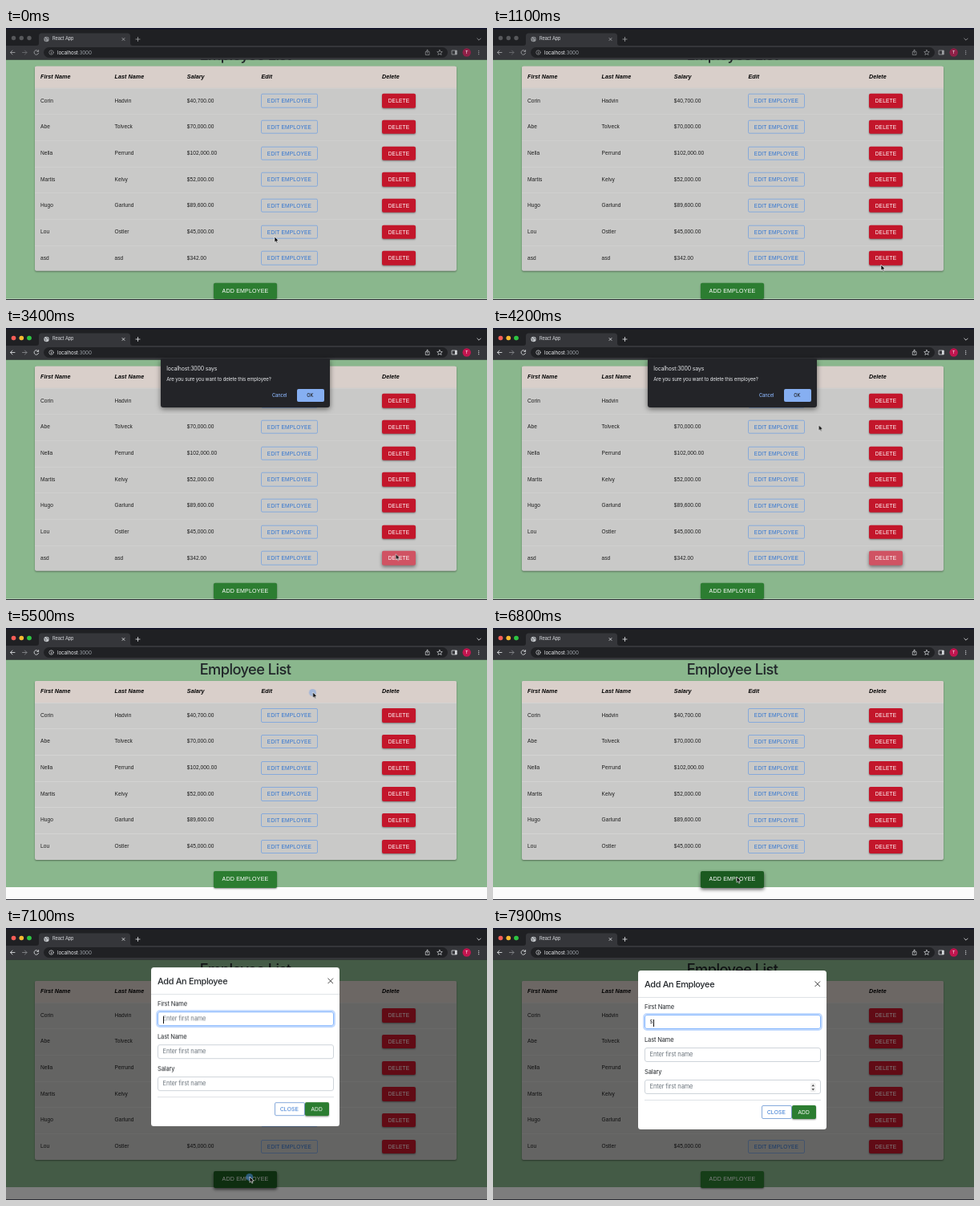
These frames come from a looping animation (600x339 px, 8000 ms). An HTML page:

```html
<!DOCTYPE html>
<html lang="en">
<head>
<meta charset="utf-8">
<title>Employee List</title>
<style>
html, body { margin: 0; width: 100%; height: 100%; overflow: hidden; background: #fbfbfb; }
#stage { position: relative; width: 600px; height: 339px; overflow: hidden; background: #fbfbfb;
  font: 6.58px/1 "Liberation Sans", Arial, sans-serif; letter-spacing: .01em; color: #1d1d1d; }
#stage * { box-sizing: border-box; white-space: nowrap; }
.abs, .cell, .ui { position: absolute; }
.ui { font-family: Inter, sans-serif; letter-spacing: -.02em; transform: translateY(-50%); }
[class*="t-"] { animation: 8s step-end infinite; }

/* page */
#page { position: absolute; left: 0; top: 39px; width: 600px; background: #8ab78d; animation-name: scroll; }
h1 { margin: 0; padding-top: 1px; height: 27px; text-align: center; color: #202529;
  font: 500 18.2px/22.6px Inter, sans-serif; letter-spacing: -.03em; position: relative; left: -1.5px; }
#table { margin-left: 36px; width: 525.5px; border-radius: 2px; background: #c9c9c8; box-shadow: 0 1px 2px rgba(0,0,0,.4); }
.head, .row { position: relative; }
.head { height: 26.6px; background: #d9cfca; border-radius: 2px 2px 0 0; font: italic bold 7.15px/26px "Liberation Sans", Arial, sans-serif; color: #000; }
.row { height: 32.7px; line-height: 32.7px; box-shadow: inset 0 .6px #dedede; }
.last { overflow: hidden; animation-name: remove; }
.btn { position: absolute; height: 17.4px; line-height: 17.4px; border-radius: 2px; text-align: center; letter-spacing: .0286em; }
.edit { left: 282px; top: 7.6px; width: 71px; border: .6px solid #86aadb; line-height: 16.2px; color: #2e73d0; }
.del { left: 433px; top: 7.6px; width: 42px; background: #c3162b; color: #fff; box-shadow: 0 1px 2px rgba(0,0,0,.4); }
.last .del { animation: press 8s linear infinite; }
.foot { position: relative; height: 34.7px; }
.add { left: 259px; top: 14.6px; width: 79px; height: 20.4px; line-height: 20.4px; font-size: 7.05px;
  background: #2c7d31; color: #fff; box-shadow: 0 1px 2px rgba(0,0,0,.45); animation: hover 8s linear infinite; }

/* browser frame */
#chrome { position: absolute; left: 0; top: 0; }
.lights { animation-name: lights; }
.icons { animation-name: icons; }
.bottom { left: 0; top: 337.8px; width: 600px; height: 2px; background: #2b2c33; }

#confirm { left: 192.5px; top: 38px; width: 211.5px; height: 61px; border-radius: 1px 1px 3px 3px; background: #232428;
  color: #e8eaed; box-shadow: 0 2px 6px rgba(0,0,0,.5); animation-name: confirm; }
#confirm .ok { left: 170.5px; top: 38px; width: 33.5px; height: 15.5px; border-radius: 2px; background: #86aff2; }

/* modal */
#shade { left: 0; top: 39px; width: 600px; height: 300px; background: #000; animation: shade 8s linear infinite; }
#modal { left: 181px; top: 53px; width: 235px; height: 198px; border-radius: 3.5px; background: #fff; color: #212529;
  animation: fade 8s linear infinite, slide 8s infinite; }
#modal .rule { left: 0; width: 235px; height: .6px; background: #dee2e6; }
#modal .label { left: 8px; font-size: 7.5px; }
.field { position: absolute; left: 8px; width: 220px; height: 18px; border: .6px solid #ced4da; border-radius: 3px; }
.field .ui { left: 5.6px; top: 50%; font-size: 7.5px; color: #6c757d; }
.focus { border-color: #86b7fe; box-shadow: 0 0 0 1.9px #c2dafe; }
.field .typed { color: #212529; animation-name: typed; }
.hint { animation-name: hint; }
.caret { left: 5.8px; top: 4.5px; width: .7px; height: 9px; background: #111; animation-name: caret; }
.spin { left: 206px; top: 3px; animation-name: spin; }
.close { left: 153.5px; top: 168px; width: 38px; border: .6px solid #86aadb; line-height: 16.2px; color: #2e73d0; }
.save { left: 191.5px; top: 168px; width: 30.5px; background: #2c7d31; color: #fff; box-shadow: 0 1px 2px rgba(0,0,0,.4); }

#cursor { left: 0; top: 0; overflow: visible; animation: move 8s linear infinite; }
#cursor path { animation-name: hide; }
#cursor circle { animation: click 8s linear infinite; }

@keyframes scroll { 0% { transform: translateY(-18.3px); } 66.1%, 100% { transform: none; } }
@keyframes remove { 0% { height: 32.7px; } 66.1%, 100% { height: 0; } }
@keyframes press {
  0%, 38% { background: #c3162b; box-shadow: 0 1px 2px rgba(0,0,0,.4); }
  42%, 100% { background: #d05363; box-shadow: 0 2px 4px rgba(0,0,0,.45); }
}
@keyframes hover {
  0%, 82.6%, 92%, 100% { background: #2c7d31; box-shadow: 0 1px 2px rgba(0,0,0,.45); }
  84.6%, 88.5% { background: #1b5a20; box-shadow: 0 2px 4px rgba(0,0,0,.6); }
}
@keyframes lights { 0% { opacity: 0; } 29.8%, 100% { opacity: 1; } }
@keyframes icons { 0% { opacity: .65; } 31%, 100% { opacity: 1; } }
@keyframes confirm { 0% { visibility: hidden; } 41.1% { visibility: visible; } 66.1%, 100% { visibility: hidden; } }
@keyframes shade { 0%, 86.1% { opacity: 0; } 88%, 100% { opacity: .5; } }
@keyframes fade { 0%, 86.3% { opacity: 0; } 88.2%, 100% { opacity: 1; } }
@keyframes slide {
  0%, 86.3% { transform: translateY(-23.5px); animation-timing-function: ease-out; }
  90.05%, 100% { transform: none; }
}
@keyframes typed { 0% { opacity: 0; } 97.3%, 100% { opacity: 1; } }
@keyframes hint { 0% { opacity: 1; } 97.3%, 100% { opacity: 0; } }
@keyframes caret { 0% { opacity: 1; } 93.7% { opacity: 0; } 97.3%, 100% { opacity: 1; transform: translateX(4px); } }
@keyframes spin { 0% { opacity: 0; } 93.7%, 100% { opacity: 1; } }
@keyframes hide { 0% { opacity: 1; } 97.3%, 100% { opacity: 0; } }
@keyframes click {
  0%, 66%, 71%, 86%, 90%, 100% { opacity: 0; }
  66.5% { opacity: .7; }
  68.75% { opacity: .38; }
  86.5%, 87.8% { opacity: .85; }
}
@keyframes move {
  0%, 1% { transform: translate(335px, 260px); }
  2.5%, 4% { transform: translate(345px, 284px); animation-timing-function: ease-in-out; }
  13.75%, 16.5% { transform: translate(484px, 295px); }
  25%, 41% { transform: translate(489px, 286.5px); animation-timing-function: ease-in; }
  51.25% { transform: translate(410px, 148px); }
  52.5% { transform: translate(406.5px, 121px); animation-timing-function: ease-out; }
  55%, 58% { transform: translate(391px, 92px); }
  63.75%, 70% { transform: translate(382.7px, 80px); }
  75%, 78% { transform: translate(355px, 200px); animation-timing-function: ease-in-out; }
  84%, 89.5% { transform: translate(304px, 310px); animation-timing-function: ease-in-out; }
  95%, 100% { transform: translate(300px, 196px); }
}
</style>
</head>
<body>
<div id="stage">
  <div id="page" class="t-page">
    <h1>Employee List</h1>
    <div id="table"></div>
    <div class="foot"><div class="btn add">ADD EMPLOYEE</div></div>
  </div>

  <div id="shade" class="abs"></div>

  <svg id="chrome" width="600" height="40" fill="none" stroke-linecap="round" stroke-linejoin="round">
    <path fill="#1f2023" d="M0 0H600V39.5H0Z"/>
    <path fill="#11122c" d="M0 0H600V1.6H0Z"/>
    <path fill="#35363a" d="M0 22H38Q41 22 41 19V10Q41 6.500 44.500 6.500H151.500Q155 6.500 155 10V19Q155 22 158 22H600V39.500H0Z"/>
    <rect x="47" y="24" width="504" height="13" rx="6.500" fill="#202124"/>
    <g fill="#57585b"><circle cx="9.500" cy="12.500" r="2.700"/><circle cx="19.300" cy="12.500" r="2.700"/><circle cx="29" cy="12.500" r="2.700"/></g>
    <g class="t-lights lights">
      <circle cx="9.500" cy="12.500" r="2.800" fill="#fb5d56"/><circle cx="19.300" cy="12.500" r="2.800" fill="#fcbb2f"/><circle cx="29" cy="12.500" r="2.800" fill="#2bc640"/>
    </g>
    <g class="t-icons icons" stroke="#d5d7da" stroke-width=".9">
      <circle cx="50.500" cy="14" r="3.200" fill="#c4c7cb" stroke="none"/>
      <path stroke="#4b4d52" stroke-width=".8" d="M48.300 13L50 14.200L49.500 16M51 11.500L51.500 13L53 13.700"/>
      <path d="M145 12.500l3 3m0-3l-3 3M162 14h5m-2.500-2.500v5M587.800 13l2.200 2.200l2.200-2.200"/>
      <path d="M11 30.500H5.500M8 28l-2.500 2.500L8 33"/>
      <path stroke="#85878b" d="M20.500 30.500H26M23.500 28l2.500 2.500L23.500 33"/>
      <path d="M40.300 29A2.800 2.800 0 1 0 40.600 31.300M40.600 27.600V29.400H38.800"/>
      <circle cx="56.500" cy="30.500" r="2.700" stroke-width=".7"/><path stroke-width=".8" d="M56.500 30.400v1.500M56.500 29v.1"/>
      <path stroke-width=".7" d="M524.500 29.500H523.300V33.500H528V29.500H526.800M525.650 31.500V27.300M524.300 28.500l1.350-1.300l1.350 1.300"/>
      <path stroke-width=".7" d="M541 27.300l1 2.200l2.300.2l-1.800 1.500l.6 2.300l-2.100-1.300l-2.100 1.300l.6-2.300l-1.800-1.500l2.300-.2Z"/>
      <path stroke-width=".8" d="M556.500 28H562.300V33H556.500Z"/><path fill="#d5d7da" stroke="none" d="M560 28h2.300v5H560Z"/>
      <circle cx="574.700" cy="30.500" r="5.200" fill="#c2154f" stroke="none"/>
      <path stroke-width="1.300" d="M589.700 28.300v.01M589.700 30.500v.01M589.700 32.700v.01"/>
    </g>
  </svg>
  <div class="ui" style="left:58px;top:14.2px;font-size:5.64px;color:#dfe1e5">React App</div>
  <div class="ui" style="left:64px;top:30.6px;font-size:6.3px;color:#e8eaed">localhost<span style="color:#9aa0a6">:3000</span></div>
  <div class="ui" style="left:572.9px;top:30.6px;font-size:5.4px;color:#fff">T</div>

  <div id="confirm" class="abs t-confirm">
    <div class="ui" style="left:7.700px;top:12.500px;font-size:6.900px">localhost:3000 says</div>
    <div class="ui" style="left:7.700px;top:26.200px;font-size:6.100px">Are you sure you want to delete this employee?</div>
    <div class="ui" style="left:139.500px;top:45.800px;font-size:5.700px;font-weight:500;color:#8ab4f8">Cancel</div>
    <div class="abs ok"></div>
    <div class="ui" style="left:182.700px;top:45.800px;font-size:5.700px;font-weight:500;color:#202124">OK</div>
  </div>

  <div id="modal" class="abs">
    <div class="ui" style="left:8px;top:16.800px;font-size:10.900px;font-weight:500;letter-spacing:-.03em">Add An Employee</div>
    <svg class="abs" style="left:220px;top:13px" width="8" height="8" stroke="#444" stroke-width="1" stroke-linecap="round"><path d="M.8 .8L6.800 6.800M6.800 .8L.8 6.800"/></svg>
    <div class="abs rule" style="top:32.500px"></div>
    <div class="ui label" style="top:46px">First Name</div>
    <div class="field focus" style="top:55.300px">
      <div class="ui t-hint hint">Enter first name</div>
      <div class="ui t-typed typed">s</div>
      <div class="abs t-caret caret"></div>
    </div>
    <div class="ui label" style="top:86.700px">Last Name</div>
    <div class="field" style="top:95.800px"><div class="ui">Enter first name</div></div>
    <div class="ui label" style="top:127.200px">Salary</div>
    <div class="field" style="top:136.300px">
      <div class="ui">Enter first name</div>
      <svg class="abs t-spin spin" width="7" height="12"><rect width="6.500" height="11.500" rx="1.500" fill="#efefef"/><path fill="#444" d="M1.500 4.300L3.250 2L5 4.300ZM1.500 7.200L3.250 9.500L5 7.200Z"/></svg>
    </div>
    <div class="abs rule" style="left:8px;width:220px;top:161.300px"></div>
    <div class="btn close">CLOSE</div>
    <div class="btn save">ADD</div>
  </div>

  <div class="abs bottom"></div>
  <svg id="cursor" class="abs" width="10" height="12">
    <circle cx="-.3" cy=".5" r="4.500" fill="#4c8ff0"/>
    <path class="t-hide" d="M0 0V7.200L1.700 5.700L2.800 8.200L4 7.700L2.900 5.200H5.100Z" fill="#0a0a0a" stroke="#fff" stroke-width=".6"/>
  </svg>
</div>
<script>
const cols = [7, 99.5, 189.8, 282.5, 433];
const people = [
  ["Corin", "Hadvin", "$40,700.00"],
  ["Abe", "Tolveck", "$70,000.00"],
  ["Nella", "Perrund", "$102,000.00"],
  ["Martis", "Kelvy", "$52,000.00"],
  ["Hugo", "Garlund", "$89,600.00"],
  ["Lou", "Ostler", "$45,000.00"],
  ["asd", "asd", "$342.00"]
];
const cells = list => list.map((text, i) => `<div class="cell" style="left:${cols[i]}px">${text}</div>`).join("");
const buttons = '<div class="btn edit">EDIT EMPLOYEE</div><div class="btn del">DELETE</div>';
const head = `<div class="head">${cells(["First Name", "Last Name", "Salary", "Edit", "Delete"])}</div>`;
const rows = people.map((p, i) =>
  `<div class="row${i === people.length - 1 ? " t-row last" : ""}">${cells(p)}${buttons}</div>`);
document.getElementById("table").innerHTML = head + rows.join("");
</script>
</body>
</html>
```
